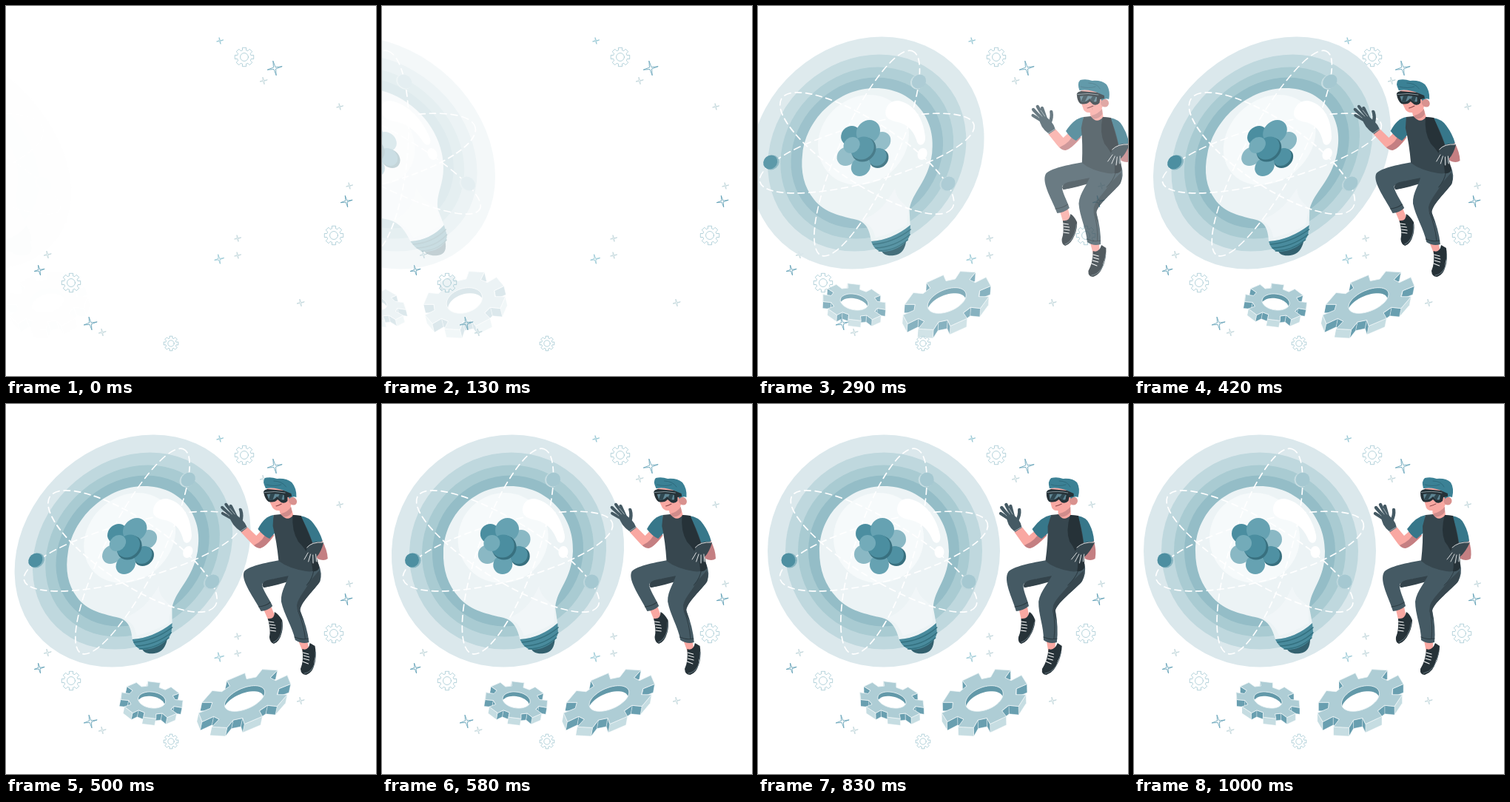
Animation of 500 by 500 pixels, one loop 1.04 s. Source, as an HTML page:

```html
<!DOCTYPE html>
<html lang="en">
<head>
<meta charset="utf-8">
<title>Virtual idea</title>
<style>
  html, body { margin: 0; width: 100%; height: 100%; overflow: hidden; background: #fff; }
  svg { display: block; width: 100vw; height: 100vh; }
</style>
</head>
<body>
<svg viewBox="0 0 500 500" stroke-linecap="round" stroke-linejoin="round" fill="none">
  <g id="icons"></g>

  <g id="bulb">
    <g id="halo"></g>
    <g id="glass">
      <path fill="#ecf3f5" d="M83 199C83 150 121 111 170 111C219 111 258 150 258 199C258 238 238 250 237 275L241 297Q220 316 191 318C187 304 182 293 168 289C147 284 123 280 106 261C91 245 83 224 83 199Z"/>
      <ellipse fill="#f6fafb" cx="163" cy="181" rx="61" ry="61"/>
      <path fill="#f7fafb" d="M172 290C192 283 203 272 214 246C218 264 230 266 236 275L236 296Q214 309 196 313C190 298 184 293 172 290Z" opacity=".5"/>
      <path fill="#fff" d="M188 144C187 134 194 127 204 128C224 132 240 150 246 177C248 188 240 191 236 184C231 172 223 161 207 157C196 155 189 152 188 144Z"/>
      <ellipse fill="#fff" cx="245" cy="200" rx="6.5" ry="8"/>
    </g>
    <g id="orbits" stroke="#fff" stroke-width="1.7" stroke-dasharray="8.5 6"></g>
    <path fill="#33616f" d="M206 330Q224 330 238 318C238 328 234 336 224 337C215 338 209 336 206 330Z"/>
    <path fill="#498b9d" d="M191 318Q219 316 241 296L242 309C241 322 222 333 206 332C199 330 194 325 191 318Z"/>
    <path stroke="#33707f" stroke-width="1.6" d="M194 322Q221 320 242 302M198 327Q223 326 242 309M203 331Q224 331 240 316"/>
    <g id="balls"></g>
    <g id="atoms"></g>
  </g>

  <g id="gears"></g>

  <g id="person">
    <!-- far arm -->
    <path fill="#c47f82" d="M437 184L452 183Q457 197 455 209Q449 213 441 209Z"/>
    <path fill="#37778a" d="M430 151Q442 153 446 162Q452 173 453 185Q445 190 437 187Z"/>
    <!-- ankles and shoes -->
    <path fill="#f9a8a2" d="M354 278L365 274L368 289L357 291ZM392 320L404 321L404 333L395 335Z"/>
    <path fill="#263238" d="M358 290Q366 291 368 281Q373 284 376 292Q376 300 372 309Q366 322 358 324Q353 322 354 315Q358 306 357 290ZM395 331Q403 334 407 323L413 327Q413 338 408 347Q405 362 393 366Q386 366 387 358Q394 347 395 331Z"/>
    <path stroke="#60727b" stroke-width="1" d="M375 295Q372 316 358 322M412 335Q408 361 391 364"/>
    <path stroke="#fff" stroke-width="1.2" d="M357 294L364 295M358 298L365 299M358 302L365 303M357 306L364 307M395 336L402 338M395 340L402 342M394 344L401 346M392 348L399 351"/>
    <!-- legs -->
    <path fill="#37474f" d="M360 246L398 226L408 236Q380 245 361 248Z"/>
    <path fill="#455a64" d="M391 211C370 214 343 220 338 227C331 239 345 263 350 280Q360 279 367 273C364 261 358 251 359 244Q361 238 398 233L410 217Z"/>
    <path fill="#33434b" d="M359 245Q360 239 372 237L398 232Q393 242 360 248Z"/>
    <path fill="#455a64" d="M397 215Q420 226 441 216Q444 229 438 240C425 254 403 270 403 279Q408 302 406 322Q396 325 388 319C388 300 380 285 380 267C382 252 395 240 398 229Z"/>
    <path stroke="#2d3c43" stroke-width="1" d="M348 274Q358 273 365 268M388 315Q397 319 406 317M437 238C420 255 400 268 400 280Q404 298 402 317M433 224Q429 236 419 245"/>
    <path fill="#37474f" d="M424 240L440 225Q441 235 437 241C424 255 404 270 403 280L405 294Q398 282 400 272C404 261 417 251 424 240Z"/>
    <!-- near arm -->
    <path fill="#f9a8a2" d="M345 173L355 166L365 178L381 164L389 178Q374 194 366 194Q360 194 356 188Z"/>
    <path fill="#c47f82" d="M359 191Q374 185 381 170L389 177Q375 193 367 195Q362 195 359 191Z"/>
    <path fill="#37778a" d="M394 150Q381 152 369 169Q374 178 382 182L391 174Z"/>
    <path fill="#455a64" d="M334 151Q338 147 345 151L350 156Q354 161 355 167L346 173Q334 164 334 151Z"/>
    <path stroke="#455a64" stroke-width="4.4" d="M337 155L326 148M338 153L327 140M341 152L333 136M343 152L339 138M348 158Q352 150 351 143"/>
    <path stroke="#dfe8eb" stroke-width=".6" d="M334 151L328 145M338 149L332 140M342 149L337 141M345 172L355 166"/>
    <!-- torso -->
    <path fill="#f9a8a2" d="M403 140L419 132L421 151Q412 164 404 154Z"/>
    <path fill="#d08c8b" d="M405 148Q414 146 420 139L420 146Q414 154 405 152Z"/>
    <path fill="#37474f" d="M394 150L404 149Q411 160 421 150L430 151Q436 166 439 187L441 220Q435 228 422 226Q399 222 388 212Q391 185 390 165Z"/>
    <path fill="#263238" d="M420 150L431 151Q434 165 438 184L441 221Q438 227 431 226Q435 205 420 186Q414 171 420 150Z"/>
    <!-- far glove -->
    <path fill="#37474f" d="M454 187Q444 184 437 189Q430 193 428 199L434 206L441 206Q448 200 454 187Z"/>
    <path stroke="#37474f" stroke-width="4" d="M431 198L424 207M434 201L429 211M437 203L434 213M439 202L438 211"/>
    <path stroke="#fff" stroke-width=".8" d="M423 210L430 201M428 213L433 203M434 215L436 204M439 213L440 203M430 194Q438 186 453 187"/>
    <!-- head -->
    <path fill="#f9a8a2" d="M393 114L420 112L422 134Q417 145 404 144Q395 145 394 137Q391 130 393 114Z"/>
    <circle fill="#d9928f" cx="424" cy="131" r="5.5"/>
    <path fill="#3b8195" d="M391 114Q388 104 393 100Q401 98 409 101Q422 100 428 106Q433 114 430 126Q425 124 420 128L417 118Q405 112 391 114Z"/>
    <path stroke="#2c6678" stroke-width=".8" d="M393 109Q403 112 413 109M404 104Q415 104 419 112"/>
    <path fill="#263238" d="M387 119Q388 116 393 115L415 117L424 121L424 125L418 126L417 131Q413 135 408 133L404 129Q399 134 391 132Q387 129 387 119Z"/>
    <path fill="#5f8593" d="M391 122Q403 120 414 123L413 129Q409 131 404 125Q398 131 392 129Z"/>
    <path fill="#2f4750" d="M396 121L402 121L397 130L392 129ZM408 122L413 122L409 130L405 126Z"/>
    <path stroke="#b7cdd4" stroke-width=".6" d="M388 119.500Q403 117 416 120"/>
    <path stroke="#8c4649" stroke-width="1" d="M400 138Q404 137 408 135"/>
  </g>
</svg>

<script>
const byId = id => document.getElementById(id);
const fill = (id, html) => byId(id).innerHTML = html;
const circle = (x, y, r, paint) => `<circle cx="${x}" cy="${y}" r="${r}" ${paint}/>`;
const disc = (x, y, r, color) => circle(x, y, r, `fill="${color}"`);
const poly = (pts, paint) =>
  `<polygon points="${pts.map(p => p.map(v => v.toFixed(1))).join(' ')}" ${paint}/>`;

// Point at an angle and radius on the plane spanned by u and w.
const onPlane = ([cx, cy], u, w, a, r) => [
  cx + r * (u[0] * Math.cos(a) + w[0] * Math.sin(a)),
  cy + r * (u[1] * Math.cos(a) + w[1] * Math.sin(a))
];

function gearOutline(c, u, w, rim = 1.1, root = 0.82) {
  const pts = [];
  for (let k = 0; k < 8; k++)
    for (const [da, r] of [[-.25, root], [-.2, rim], [.2, rim], [.25, root]])
      pts.push(onPlane(c, u, w, k * Math.PI / 4 + da, r));
  return pts;
}

function solidGear(c, u, w, depth, id) {
  const pts = gearOutline(c, u, w);
  const down = ([x, y]) => [x, y + depth];
  const hole = Array.from({ length: 48 }, (_, i) => onPlane(c, u, w, i * Math.PI / 24, .48));
  const sides = pts.map((a, i) => ({ a, b: pts[(i + 1) % pts.length], end: i % 4 == 1 }))
    .filter(s => s.b[0] > s.a[0])
    .sort((p, q) => p.a[1] + p.b[1] - q.a[1] - q.b[1])
    .map(({ a, b, end }) => poly([a, b, down(b), down(a)],
      `fill="${end ? '#c6dde2' : '#699fb0'}" stroke="#fff" stroke-width=".4"`));
  return sides.join('') + poly(pts, 'fill="#aecdd5" stroke="#eef5f7" stroke-width=".8"') +
    `<clipPath id="${id}">${poly(hole, '')}</clipPath><g clip-path="url(#${id})">` +
    poly(hole, 'fill="#6399a9"') + poly(hole.map(([x, y]) => [x, y + depth * .65]), 'fill="#fff"') +
    '</g>' + poly(hole, 'stroke="#eef5f7" stroke-width=".8"');
}

function gearIcon([x, y, r]) {
  const line = 'fill="#fff" stroke="#9cc4cf" stroke-width=".75"';
  return poly(gearOutline([x, y], [r, 0], [0, r], 1, .74), line) + circle(x, y, r * .42, line);
}

function sparkle([x, y, r, color]) {
  const pts = Array.from({ length: 8 }, (_, i) =>
    onPlane([x, y], [r, 0], [0, r], i * Math.PI / 4 - .22, i % 2 ? .18 : 1));
  return poly(pts, `fill="#fff" stroke="${color}" stroke-width=".7"`);
}

const strong = '#4590a9', mid = '#7fbaca', pale = '#b5ced4';
fill('icons',
  [[322, 69, 13], [88, 374, 13], [443, 310, 13], [223, 456, 10]].map(gearIcon).join('') +
  [[289, 47, 4.5, mid], [348, 101, 5, pale], [363, 84, 10, strong], [451, 136, 4.5, pale],
   [464, 243, 4.5, pale], [460, 264, 8, strong], [313, 314, 4.5, pale], [313, 337, 4.5, pale],
   [288, 342, 6.5, mid], [398, 401, 5, pale], [45, 357, 7, strong], [56, 336, 5, pale],
   [114, 429, 9, strong], [130, 441, 5, pale]].map(sparkle).join(''));

fill('halo', [[157, '#dbe8ec'], [133, '#bfd8de'], [116, '#a9cbd2'], [102, '#94bdc7']]
  .map(([r, color]) => disc(170, 198.5, r, color)).join(''));
fill('orbits', [-72.5, 31, -15].map(a =>
  `<ellipse rx="145" ry="40" transform="translate(170 199) rotate(${a})"/>`).join(''));
fill('balls', [[228, 102, '#a5c8d1', '#c7dde2'], [41, 211, '#4d8fa1', '#87b5c1'], [285, 240, '#a5c8d1', '#bcd6dc']]
  .map(([x, y, color, rim]) => disc(x + (x < 100 ? 2 : -1.5), y + .5, 10, rim) + disc(x, y, 9.5, color)).join(''));
fill('atoms', [
  [145, 175, 13, '#4b8ea0'], [187, 183, 13, '#8ab8c4'], [143, 203, 13, '#8ab8c4'],
  [187, 206, 13, '#38707f'], [185, 204, 12, '#4f91a3'], [164, 217, 13, '#66a2b2'],
  [168, 170, 16, '#66a2b2'], [165, 194, 16.5, '#38707f'], [163, 192, 15.5, '#4b8ea0'],
  [148, 188, 11, '#73abb9']].map(a => disc(...a)).join(''));
fill('gears',
  solidGear([181, 400], [39.5, 5], [-2, -22.5], 9, 'smallHole') +
  solidGear([306, 398], [47.5, 2.5], [24, -36], 11.5, 'bigHole'));

// cubic-bezier(.36, -.01, .5, 1.38)
function ease(x) {
  const curve = (a, b, s) => 3 * a * s * (1 - s) ** 2 + 3 * b * s * s * (1 - s) + s ** 3;
  let lo = 0, hi = 1;
  for (let i = 0; i < 24; i++) {
    const s = (lo + hi) / 2;
    curve(.36, .5, s) < x ? lo = s : hi = s;
  }
  return curve(-.01, 1.38, lo);
}

// Keys: time, shift, skew slope, opacity
const keys = [[0, -250, .364, 0], [.6, 0, -.176, 1], [.8, 0, .035, 1], [1, 0, 0, 1]];

function place(id, side, centerY, progress) {
  const q = Math.min(progress, 1);
  const i = q < .6 ? 0 : q < .8 ? 1 : 2;
  const [from, to] = [keys[i], keys[i + 1]];
  const p = ease((q - from[0]) / (to[0] - from[0]));
  const [, x, slope, opacity] = from.map((v, j) => v + (to[j] - v) * p);
  const k = side * slope;
  const el = byId(id);
  el.setAttribute('transform', `matrix(1 0 ${k} 1 ${side * x - k * centerY} 0)`);
  el.setAttribute('opacity', Math.max(0, Math.min(1, opacity)));
}

const LOOP = 1040, STEP = 1000 / 24;
function draw(now) {
  const step = Math.min(24, Math.floor((now % LOOP + 4.9) / STEP));
  const time = 25 + (step < 2 ? 0 : step * STEP);
  place('bulb', 1, 198.5, time / 880);
  place('gears', 1, 403.5, time / 1000);
  place('person', -1, 232, time / 1000);
}

const start = performance.now();
function tick() {
  draw(performance.now() - start);
  requestAnimationFrame(tick);
}
tick();
</script>
</body>
</html>
```
